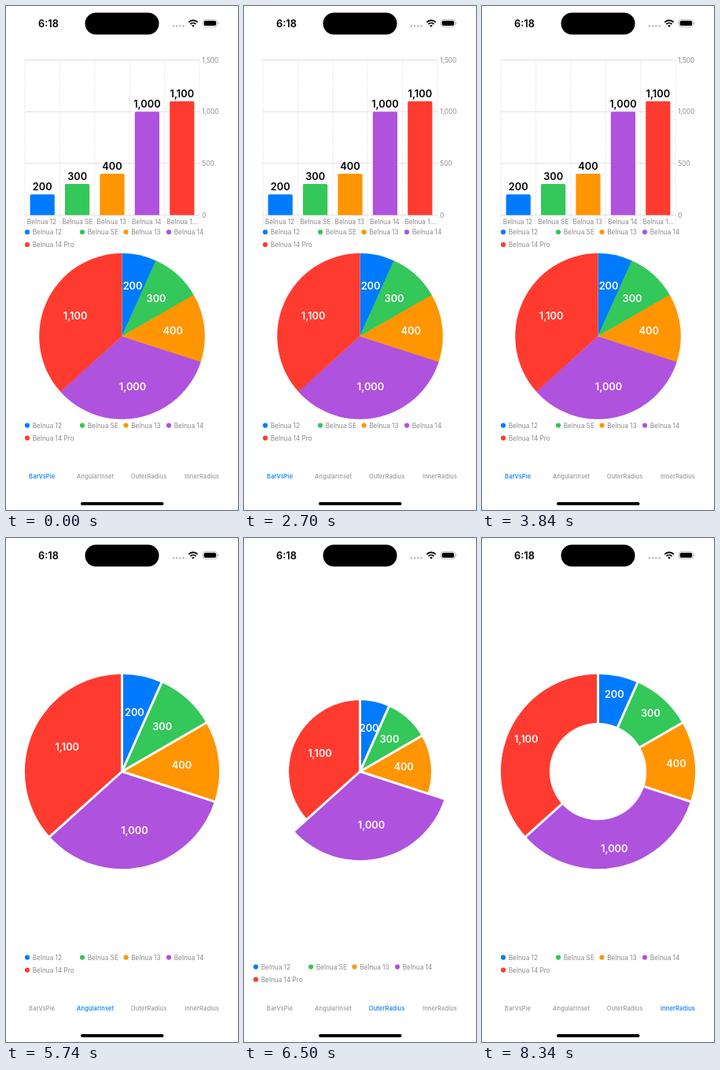
These frames come from a looping animation (295x640 px, 8.36 s). An HTML page:

```html
<!DOCTYPE html>
<html lang="en">
<head>
<meta charset="utf-8">
<title>Sector charts</title>
<style>
  html, body { margin: 0; width: 100%; height: 100%; overflow: hidden; background: #fff; }
  svg { display: block; width: 100%; height: 100%; }
  text { font-family: Inter, "Noto Sans", sans-serif; }
  .value { font-size: 12.75px; font-weight: 600; text-anchor: middle; }
  .small { font-size: 8.25px; fill: #8a8a8e; }
  .tab { font-size: 7.5px; font-weight: 500; letter-spacing: .12px; fill: #999; text-anchor: middle; }
  .tab.on { fill: #007aff; }
  .scene { visibility: hidden; }
  .scene.on { visibility: visible; }
</style>
</head>
<body>
<svg id="stage" viewBox="0 0 295 640">
  <text x="54" y="26.6" class="value">6:18</text>
  <rect x="100.5" y="8.5" width="94" height="27.7" rx="13.85"/>
  <g fill="#bdbdbf">
    <circle cx="212.9" cy="25.4" r="1.3"/><circle cx="217.1" cy="25.4" r="1.3"/>
    <circle cx="221.3" cy="25.4" r="1.3"/><circle cx="225.5" cy="25.4" r="1.3"/>
  </g>
  <g fill="none" stroke="#000" stroke-width="1.8">
    <path d="M232.3 20.6a8.1 8.1 0 0 1 11.4 0"/>
    <path d="M234.5 23a5 5 0 0 1 7 0"/>
  </g>
  <path d="M236.2 24.9a2.6 2.6 0 0 1 3.6 0L238 26.8z"/>
  <rect x="250.4" y="17.4" width="18" height="9" rx="2.9" fill="none" stroke="#aaa" stroke-width=".8"/>
  <rect x="251.7" y="18.7" width="15.4" height="6.4" rx="1.8"/>
  <path d="M269.4 20.4a1.6 1.6 0 0 1 0 3z" fill="#aaa"/>
  <rect x="95" y="630" width="105.5" height="4" rx="2"/>
</svg>
<script>
const NS = 'http://www.w3.org/2000/svg';
const stage = document.getElementById('stage');

const items = [
  { name: 'Belnua 12', value: 200, color: '#007aff', key: 27 },
  { name: 'Belnua SE', value: 300, color: '#34c759', key: 97 },
  { name: 'Belnua 13', value: 400, color: '#ff9500', key: 152.5 },
  { name: 'Belnua 14', value: 1000, color: '#af52de', key: 207 },
  { name: 'Belnua 14 Pro', value: 1100, color: '#ff3b30', key: 27, row: 1 }
];
const total = items.reduce((sum, d) => sum + d.value, 0);
const tabs = [['BarVsPie', 45.7], ['AngularInset', 113.7], ['OuterRadius', 181.6], ['InnerRadius', 249]];

function add(parent, tag, attrs, text) {
  const node = document.createElementNS(NS, tag);
  for (const k in attrs) node.setAttribute(k, attrs[k]);
  if (text) node.textContent = text;
  return parent.appendChild(node);
}
const format = n => n.toLocaleString('en-US');
const polar = (cx, cy, r, a) => [cx + r * Math.sin(a), cy - r * Math.cos(a)];

function sectorPath(cx, cy, r, from, to) {
  const large = to - from > Math.PI ? 1 : 0;
  return `M${cx} ${cy}L${polar(cx, cy, r, from)}A${r} ${r} 0 ${large} 1 ${polar(cx, cy, r, to)}Z`;
}

function pie(g, { cy, radius, inner = 0, gap = 0 }) {
  const cx = 147.5;
  const labels = [];
  const edges = [];
  let from = 0;
  items.forEach((d, i) => {
    const to = from + d.value / total * 2 * Math.PI;
    const r = radius(d);
    // a slight overlap hides the seam between touching sectors
    const overlap = gap || i === items.length - 1 ? 0 : .005;
    add(g, 'path', { d: sectorPath(cx, cy, r, from, to + overlap), fill: d.color });
    edges.push(from);
    labels.push([d.value, polar(cx, cy, inner + (r - inner) * .618, (from + to) / 2)]);
    from = to;
  });
  if (gap) {
    for (const a of edges) {
      const [x2, y2] = polar(cx, cy, 128, a);
      add(g, 'line', { x1: cx, y1: cy, x2, y2, stroke: '#fff', 'stroke-width': gap });
    }
  }
  if (inner) add(g, 'circle', { cx, cy, r: inner, fill: '#fff' });
  for (const [value, [x, y]] of labels) {
    add(g, 'text', { x, y: y + 4.6, class: 'value', fill: '#fff' }, format(value));
  }
}

function legend(g, y, dx = 0) {
  for (const d of items) {
    const cy = y + (d.row ? 16 : 0);
    add(g, 'circle', { cx: d.key + dx, cy, r: 3.1, fill: d.color });
    add(g, 'text', { x: d.key + 6.7 + dx, y: cy + 3, class: 'small' }, d.name);
  }
}

function bars(g) {
  const left = 24, right = 246, base = 265.5, band = 44.4;
  const yOf = v => base - v * .1313;
  for (let v = 0; v <= 1500; v += 500) {
    const y = yOf(v);
    add(g, 'line', { x1: left, x2: right, y1: y, y2: y, stroke: '#d8d8da', 'stroke-width': .8 });
    add(g, 'text', { x: 249.3, y: y + 3, class: 'small' }, format(v));
  }
  for (let i = 0; i <= items.length; i++) {
    const x = left + i * band;
    add(g, 'line', { x1: x, x2: x, y1: 68.5, y2: 277, stroke: '#d8d8da', 'stroke-width': .8, 'stroke-dasharray': '1.5 1.5' });
  }
  items.forEach((d, i) => {
    const mid = left + (i + .5) * band;
    const x = mid - 15.6, top = yOf(d.value);
    add(g, 'path', {
      d: `M${x} ${base}V${top + 1.5}q0 -1.5 1.5 -1.5h28.2q1.5 0 1.5 1.5V${base}Z`,
      fill: d.color
    });
    add(g, 'text', { x: mid, y: top - 5.4, class: 'value' }, format(d.value));
    const name = d.name.length > 9 ? d.name.slice(0, 8) + '...' : d.name;
    add(g, 'text', { x: left + i * band + 2.8, y: 276.7, class: 'small' }, name);
  });
}

function tabBar(g, active) {
  tabs.forEach(([label, x], i) => {
    add(g, 'text', { x, y: 599.6, class: i === active ? 'tab on' : 'tab' }, label);
  });
}

const builders = [
  g => {
    bars(g);
    legend(g, 287);
    pie(g, { cy: 419.4, radius: () => 105.3 });
    legend(g, 532.6);
  },
  g => {
    pie(g, { cy: 296.5, radius: () => 123.6, gap: 3 });
    legend(g, 532.6);
  },
  g => {
    pie(g, { cy: 296.5, radius: d => d.value === 1000 ? 112.7 : 90.4, gap: 3 });
    legend(g, 544.6, -12);
  },
  g => {
    pie(g, { cy: 296.5, radius: () => 123.6, inner: 61.7, gap: 3 });
    legend(g, 532.6);
  }
];
const scenes = builders.map((build, i) => {
  const g = add(stage, 'g', { class: 'scene' });
  build(g);
  tabBar(g, i);
  return g;
});

// end time of each scene in ms
const ends = [4600, 6500, 6620, 8360];
const start = performance.now();
let shown = -1;

function tick() {
  const t = (performance.now() - start) % ends[ends.length - 1];
  const now = ends.findIndex(end => t < end);
  if (now !== shown) {
    scenes.forEach((g, i) => g.classList.toggle('on', i === now));
    shown = now;
  }
  requestAnimationFrame(tick);
}
tick();
</script>
</body>
</html>
```
